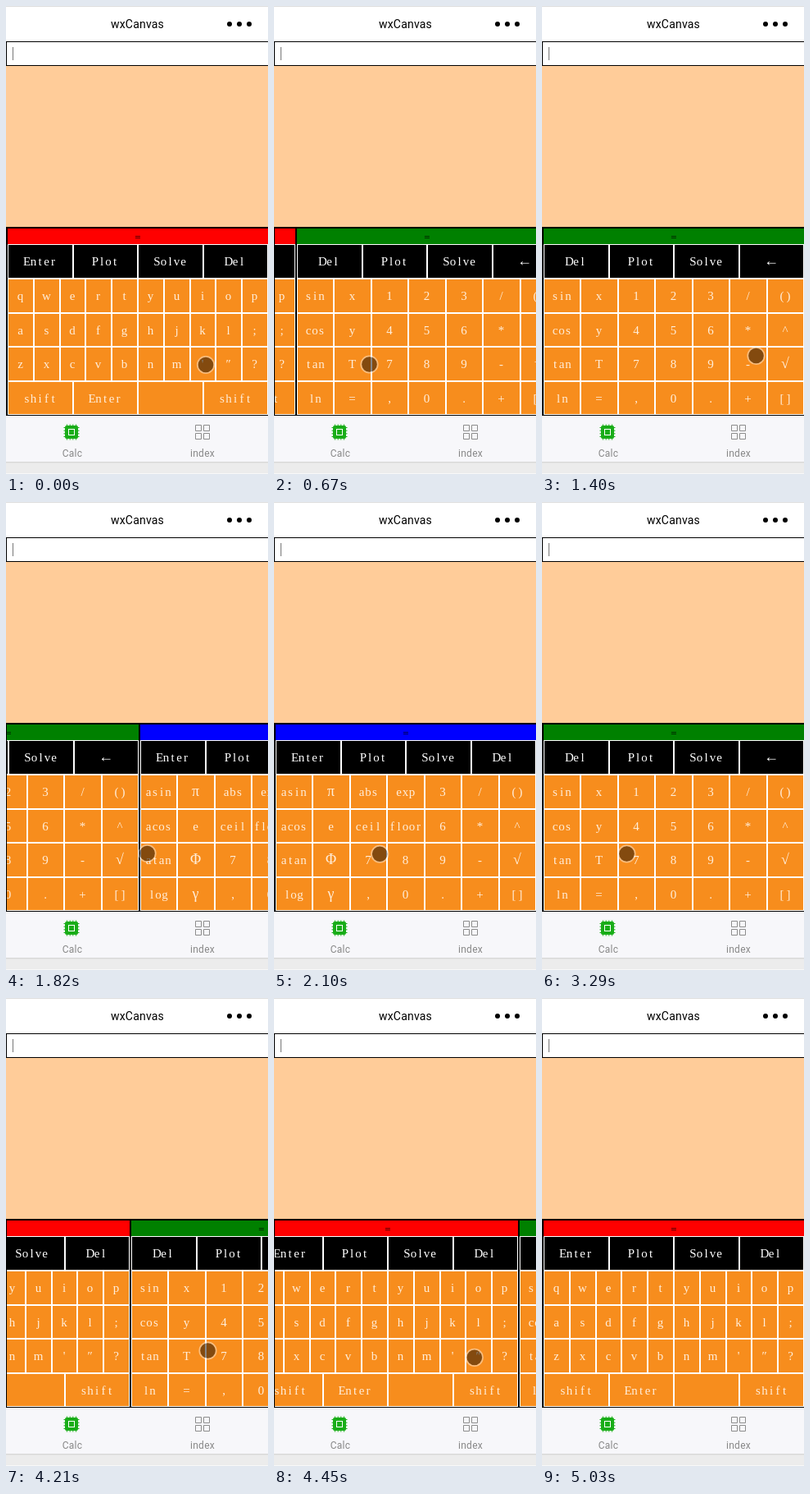
These frames come from a looping animation (320x570 px, 6.06 s). An HTML page:

```html
<!DOCTYPE html>
<html lang="en">
<head>
<meta charset="utf-8">
<title>Calculator keyboard</title>
<style>
  html, body { margin: 0; width: 100%; height: 100%; overflow: hidden; background: #ececec; }
  svg { display: block; }
  text { text-anchor: middle; }
  .title { font: 14px Roboto, "Liberation Sans", sans-serif; letter-spacing: .2px; }
  .tab { font: 12px Roboto, "Liberation Sans", sans-serif; letter-spacing: .3px; fill: #888; }
  .key { font: 15px "Liberation Serif", serif; fill: #fff; }
  .soft { fill: #ffeedb; }
  .wide { font-size: 18px; }
  .equals { font: 13px "Liberation Serif", serif; }
</style>
</head>
<body>
<svg width="320" height="570" viewBox="0 0 320 570">
  <rect width="320" height="570" fill="#ececec"/>
  <rect width="320" height="43" fill="#fff"/>
  <rect width="320" height="1" fill="#ddd"/>
  <text class="title" x="160.5" y="27">wxCanvas</text>
  <circle cx="273" cy="22" r="3"/><circle cx="285" cy="22" r="3"/><circle cx="297" cy="22" r="3"/>

  <rect y="73" width="320" height="197" fill="#fc9"/>
  <rect x=".5" y="43.5" width="330" height="29" fill="#fff" stroke="#000"/>
  <rect x="8" y="50" width="1" height="16" fill="#777"/>

  <rect y="269" width="320" height="230"/>
  <clipPath id="window"><rect x="1" y="269" width="319" height="230"/></clipPath>
  <g clip-path="url(#window)"><g id="strip"></g></g>

  <rect y="499" width="320" height="56" fill="#f7f7fa"/>
  <rect y="555" width="320" height="1" fill="#d8d8d8"/>
  <rect y="556" width="320" height="1" fill="#e3e3e3"/>
  <rect y="569" width="320" height="1" fill="#f8f8f8"/>
  <g fill="none" stroke="#1aad19">
    <rect x="72" y="511" width="16" height="16" rx="2" fill="#1aad19" stroke="none"/>
    <path id="pins" d="M70.5 513.5h19m-19 3.7h19m-19 3.6h19m-19 3.7h19"/>
    <use href="#pins" transform="rotate(90 80 519)"/>
    <rect x="76.5" y="515.5" width="7" height="7" stroke="#fff"/>
  </g>
  <path d="M231.5 510.5h7v7h-7zm10 0h7v7h-7zm-10 10h7v7h-7zm10 0h7v7h-7z" fill="none" stroke="#8c8c8c"/>
  <text class="tab" x="81" y="549">Calc</text>
  <text class="tab" x="240" y="549">index</text>

  <g id="touch">
    <circle r="9.5" fill="#000" fill-opacity=".47"/>
    <circle r="10.2" fill="none" stroke="#fff" stroke-opacity=".42" stroke-width="1.8"/>
  </g>
</svg>
<script>
const LOOP = 6060, TICK = 140, LEAD = 35;
const STRIDE = 320, WIDTH = 318, BAR = 19.4, ROW = 41.6, PITCH = 8;

const pages = [
  { color: '#f00', rows: ['Enter Plot Solve Del', 'q w e r t y u i o p', 'a s d f g h j k l ;',
    "z x c v b n m ' ″ ?", 'shift Enter _ shift'] },
  { color: '#008000', rows: ['Del Plot Solve ←', 'sin x 1 2 3 / ()', 'cos y 4 5 6 * ^',
    'tan T 7 8 9 - √', 'ln = , 0 . + []'] },
  { color: '#00f', rows: ['Enter Plot Solve Del', 'asin π abs exp 3 / ()', 'acos e ceil floor 6 * ^',
    'atan Φ 7 8 9 - √', 'log γ , 0 . + []'] }
];

const swipes = [
  { start: 0, length: 856, step: 1 },
  { start: 1545, length: 555, step: 1 },
  { start: 2800, length: 420, step: -1 },
  { start: 3810, length: 808, step: -1 }
];

// Finger path: time, x, y
const path = [
  [0, 244, 437], [480, 112, 436], [700, 116.5, 436.5], [980, 231, 431], [1400, 261.5, 426],
  [1540, 261.5, 426], [1960, 128, 429], [2240, 130.5, 428.5], [2500, 113.5, 428.5],
  [2800, 113.5, 428.5], [3080, 220, 428], [3220, 103.5, 428.5], [3780, 103.5, 428.5],
  [4200, 246.5, 429.5], [4620, 244, 442], [4900, 254, 519]
];

function add(parent, tag, attrs, label) {
  const node = document.createElementNS('http://www.w3.org/2000/svg', tag);
  for (const name in attrs) node.setAttribute(name, attrs[name]);
  if (label) node.textContent = label;
  return parent.appendChild(node);
}

// Centre each letter in its own fixed-pitch cell
function cells(label, centre) {
  return [...label].map((_, i) => centre + (i - (label.length - 1) / 2) * PITCH).join(' ');
}

function drawRow(page, labels, index) {
  const edge = i => Math.round(i * WIDTH / labels.length);
  const y = Math.round(BAR + index * ROW);
  const height = Math.round(BAR + (index + 1) * ROW) - y;
  labels.forEach((label, i) => {
    const x = edge(i), width = edge(i + 1) - x;
    add(page, 'rect', { x, y, width, height, fill: index ? '#f78d1d' : '#000',
      stroke: '#fff', 'stroke-width': 2 });
    if (label === '_') return;
    const style = (index ? ' soft' : '') + (/[←√πΦγ]/.test(label) ? ' wide' : '');
    add(page, 'text', { class: 'key' + style, x: cells(label, x + width / 2 - .5),
      y: y + height / 2 + 5 }, label);
  });
}

function drawPage({ color, rows }, i) {
  const page = add(strip, 'svg', { x: 2 + i * STRIDE, y: 271, width: WIDTH, height: 227 });
  rows.forEach((row, r) => drawRow(page, row.split(' '), r));
  add(page, 'rect', { width: WIDTH, height: Math.round(BAR), fill: color });
  add(page, 'text', { class: 'equals', x: WIDTH / 2, y: 14.5 }, '=');
}

const clamp = v => Math.min(1, Math.max(0, v));
const ease = v => (1 - Math.cos(Math.PI * clamp(v))) / 2;

function scrollAt(time) {
  return STRIDE * swipes.reduce((sum, s) => sum + s.step * ease((time - s.start) / s.length), 0);
}

function fingerAt(time) {
  const next = Math.max(1, path.findIndex(point => point[0] > time));
  const [t0, x0, y0] = path[next - 1], [t1, x1, y1] = path[next];
  const part = clamp((time - t0) / (t1 - t0));
  return [x0 + (x1 - x0) * part, y0 + (y1 - y0) * part];
}

const strip = document.getElementById('strip');
const touch = document.getElementById('touch');
pages.forEach(drawPage);

const start = performance.now();
function draw(now) {
  const elapsed = Math.max(0, now - start) % LOOP;
  const time = Math.floor((elapsed + LEAD) / TICK) * TICK;
  const lifted = time > path.at(-1)[0];
  strip.setAttribute('transform', `translate(${-Math.round(scrollAt(time))} 0)`);
  touch.setAttribute('visibility', lifted ? 'hidden' : 'visible');
  if (!lifted) touch.setAttribute('transform', `translate(${fingerAt(time)})`);
  requestAnimationFrame(draw);
}
draw(start);
</script>
</body>
</html>
```
